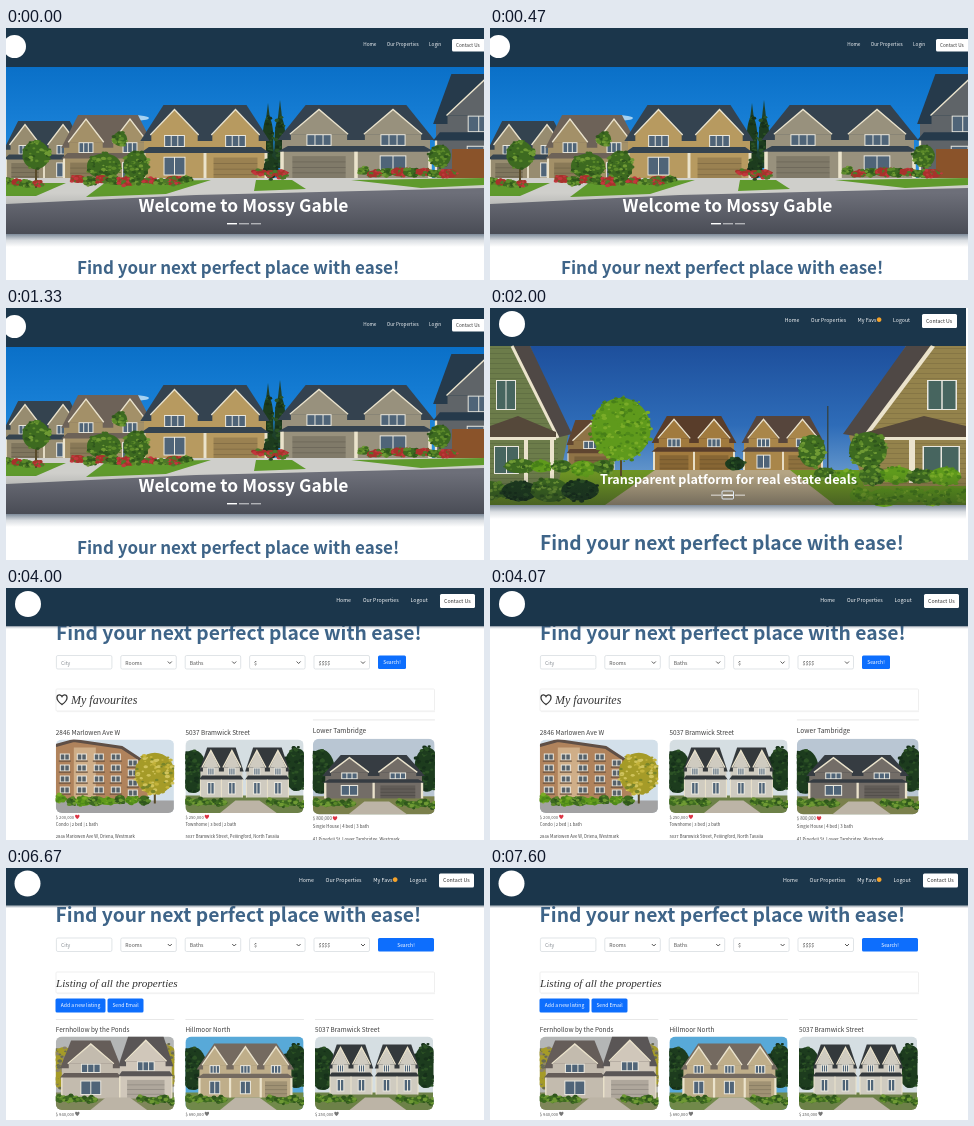
An HTML page that plays this animation: 478 px wide and 252 px high, repeating every 8000 ms.

```html
<!DOCTYPE html>
<html lang="en">
<head>
<meta charset="utf-8">
<title>Property listings</title>
<style>
html, body { margin: 0; width: 100%; height: 100%; overflow: hidden; background: #fff; }
svg { display: block; width: 478px; height: 252px; }
text { font-family: "Noto Sans CJK JP", "Noto Sans CJK SC", "Noto Sans", sans-serif; white-space: pre; }
.script { font-family: "Liberation Serif", "Noto Serif", serif; font-style: italic; }
</style>
</head>
<body>
<svg id="stage" viewBox="0 0 478 252"></svg>
<script>
const NAVY = '#1b364b', BLUE = '#0d6efd', TITLE = '#3e6488', CREAM = '#ebe3cc';
const GREEN = ['#3d6a20', '#5c8a2a', '#2f561c', '#6f9a34'];
const DARK = ['#1d3c1e', '#2c5225', '#16301a'];
const LIME = ['#5f9a1c', '#7aac28', '#477f18', '#4f8a1a'];
const GOLD = ['#a59b28', '#c5b43c', '#78852a', '#d0c35c'];
const RED = ['#a8322c', '#c2373d', '#4d7a2a'];
const slogan = 'Find your next perfect place with ease!';

// Drawing helpers, each returns SVG markup
const rect = (x, y, w, h, fill, more = '') =>
  `<rect x="${x}" y="${y}" width="${w}" height="${h}" fill="${fill}" ${more}/>`;
const poly = (points, fill) => `<polygon points="${points}" fill="${fill}"/>`;
const line = (points, color, w = 1) =>
  `<polyline points="${points}" fill="none" stroke="${color}" stroke-width="${w}"/>`;
const oval = (x, y, rx, ry, fill) => `<ellipse cx="${x}" cy="${y}" rx="${rx}" ry="${ry}" fill="${fill}"/>`;
const text = (x, y, size, str, fill = '#444', more = '') =>
  `<text x="${x}" y="${y}" font-size="${size}" fill="${fill}" ${more}>${str}</text>`;
const bold = (x, y, size, str, fill) => text(x, y, size, str, fill, 'font-weight="700"');
const script = (x, y, size, str) => text(x, y, size, str, '#333', 'class="script"');
const grad = (id, ...stops) => `<linearGradient id="${id}" x2="0" y2="1">${stops.map((s, i) =>
  `<stop offset="${i / (stops.length - 1)}" stop-color="${s}"/>`).join('')}</linearGradient>`;
const repeat = (n, draw) => Array.from({ length: n }, (_, i) => draw(i)).join('');

function random(seed) {
  return () => (seed = (seed * 16807) % 2147483647) / 2147483647;
}

// Clump of leaves filling an ellipse
function leaves(cx, cy, rx, ry, colors) {
  const rnd = random(Math.round(cx * 131 + cy * 17 + 7));
  return oval(cx, cy, rx * .9, ry * .9, colors[0]) + repeat(Math.ceil(rx * ry / 6) + 10, () => {
    const a = rnd() * 6.283, d = Math.sqrt(rnd()) * .95, r = 1 + rnd() * 1.6;
    return oval((cx + Math.cos(a) * rx * d).toFixed(1), (cy + Math.sin(a) * ry * d).toFixed(1),
      r.toFixed(1), (r * .7).toFixed(1), colors[Math.floor(rnd() * colors.length)]);
  });
}

// Row of low bushes with varied size
function hedge(x0, x1, y, r, palettes) {
  const rnd = random(x0 + 50 + y * 3);
  return repeat(Math.ceil((x1 - x0) / (r * 1.5)), i =>
    leaves(x0 + i * r * 1.5, y + rnd() * 3, r * (.7 + rnd() * .6), r * (.4 + rnd() * .3), palettes[i % palettes.length]));
}

const tree = (x, y, r, colors, base) => rect(x - 1, y, 2, base - y, '#574a2a') + leaves(x, y, r, r * 1.05, colors);

function pane(x, y, w, h, cols = 2, glass = '#4f6478') {
  const step = (w - 1) / cols;
  return rect(x, y, w, h, '#e9e7de') + repeat(cols, i => rect(x + 1 + i * step, y + 1, step - 1, h - 2, glass));
}

const garage = (x, y, w, h) => rect(x, y, w, h, '#000', 'opacity=".16"')
  + repeat(3, i => rect(x, y + h * (i + 1) / 4, w, .7, '#000', 'opacity=".2"'));

const gable = (x, peak, w, h, wall) => poly([x, peak + h, x + w / 2, peak, x + w, peak + h], wall)
  + line([x - 1, peak + h, x + w / 2, peak, x + w + 1, peak + h], CREAM, 1.4);

// Two-storey house; bays name the ground floor: g garage, w window
function house(x, base, w, h, bays, wall, roof) {
  const n = bays.length, bay = w / n, eave = base - h * .6, band = base - h * .36;
  const slope = (top, bottom, inset) =>
    poly([x - w * .03, bottom, x + w * inset, top, x + w * (1 - inset), top, x + w * 1.03, bottom], roof);
  return rect(x, eave, w, base - eave, wall) + slope(base - h, eave + h * .08, .16)
    + repeat(n, i => {
      const left = x + (i + .12) * bay, wide = bay * .76, mid = x + (i + .5) * bay;
      return gable(left, base - h * .94, wide, h * .34, wall) + rect(left, eave, wide, h * .2, wall)
        + pane(mid - bay * .17, eave, bay * .34, h * .16, 3);
    })
    + slope(band - h * .08, band, .04)
    + repeat(n, i => bays[i] === 'g' ? garage(x + (i + .14) * bay, base - h * .3, bay * .72, h * .3)
      : pane(x + (i + .32) * bay, base - h * .31, bay * .36, h * .25))
    + repeat(n + 1, i => rect(x + i * bay - w * .012, band, w * .024, h * .36, CREAM));
}

function street() {
  return rect(0, 39, 478, 167, 'url(#sky1)') + oval(126, 90, 17, 3, '#a5d2f2')
    + house(0, 153, 76, 60, 'gw', '#978c70', '#34434f') + house(58, 155, 88, 68, 'gw', '#a39068', '#6d6258')
    + house(430, 150, 96, 104, 'w', '#5f6468', '#263a4b')
    + repeat(2, i => poly([262 + i * 12, 75 - i * 3, 270 + i * 12, 140, 254 + i * 12, 140], '#1f402c')
      + leaves(262 + i * 12, 112, 6, 26, DARK))
    + house(138, 152, 122, 75, 'wg', '#b79a60', '#344350') + house(276, 150, 148, 73, 'gw', '#98917d', '#34424f')
    + rect(446, 121, 32, 29, '#8a532a')
    + rect(0, 150, 478, 30, '#cfcfcb') + poly('0,155 60,155 30,168 0,168', '#5f9a2c')
    + poly('100,154 205,152 160,166 80,169', '#5f9a2c') + poly('250,152 286,152 300,161 248,163', '#5f9a2c')
    + poly('345,152 478,150 478,157 415,160', '#5f9a2c')
    + tree(30, 127, 15, GREEN, 160) + tree(434, 128, 12, GREEN, 150) + leaves(98, 138, 19, 14, GREEN)
    + leaves(130, 138, 14, 17, GREEN) + leaves(114, 111, 8, 8, GREEN) + leaves(265, 140, 8, 12, DARK)
    + hedge(0, 40, 153, 7, [GREEN, RED]) + hedge(72, 190, 151, 8, [RED, GREEN])
    + hedge(254, 285, 144, 7, [RED]) + hedge(358, 446, 143, 8, [GREEN, RED])
    + poly('0,176 190,167 478,160 478,206 0,206', '#6d6f79') + rect(0, 165, 478, 41, 'url(#shade)');
}

// House at the left edge, cut off by the frame
function nearHouse(wall) {
  return poly('0,38 40,38 78,128 68,178 0,178', wall)
    + repeat(28, i => rect(0, 40 + i * 5, 40 + Math.min(i, 14) * 2, .7, '#000', 'opacity=".14"'))
    + poly('24,38 40,38 82,126 66,130', '#4f4845') + line('22,38 68,130', CREAM, 3)
    + pane(6, 72, 20, 30, 2, '#47655f') + poly('0,118 28,108 66,124 66,130 0,130', '#55483a')
    + rect(0, 129, 66, 3, CREAM) + pane(4, 138, 25, 28, 2, '#47655f')
    + repeat(2, i => rect(34 + i * 26, 131, 4, 44, CREAM));
}

function suburb() {
  return rect(0, 38, 476, 159, 'url(#sky2)')
    + house(78, 164, 46, 52, 'g', '#8f7346', '#5f4530') + house(164, 164, 80, 56, 'gg', '#a17a3e', '#593d2a')
    + house(254, 164, 78, 56, 'wg', '#a9864a', '#56453c') + rect(337, 98, 1.5, 62, '#34474f')
    + rect(0, 162, 476, 35, '#6d9424') + poly('165,162 300,162 345,197 115,197', '#b5a584')
    + nearHouse('#6c7c4a') + `<g transform="translate(476) scale(-1.5 1)">${nearHouse('#94834c')}</g>`
    + tree(131, 121, 33, LIME, 168) + leaves(322, 143, 15, 18, GREEN) + leaves(378, 142, 21, 20, GREEN)
    + leaves(245, 156, 11, 7, DARK) + hedge(30, 130, 158, 14, [GREEN, LIME]) + hedge(335, 478, 166, 16, [GREEN, LIME])
    + hedge(0, 110, 182, 20, [GREEN, DARK]) + hedge(370, 478, 187, 16, [LIME]) + rect(0, 165, 476, 32, 'url(#shade)');
}

// Card pictures, each 118 by 74
const yard = (sky, back, lawn, building) => rect(0, 0, 118, 74, sky) + leaves(8, 32, 15, 24, back)
  + leaves(111, 30, 14, 24, back) + rect(0, 56, 118, 18, lawn) + building
  + poly('50,61 74,61 92,74 34,74', '#bcb4a6') + hedge(4, 44, 62, 7, [GREEN]) + hedge(86, 118, 62, 7, [GREEN]);

const pictures = {
  condo: () => rect(0, 0, 118, 74, '#d3e0ea') + poly('0,6 18,1 66,8 92,25 92,62 0,62', '#b0835c')
    + line('0,6 18,1 66,8 92,25', '#5f4f46', 3) + rect(18, 8, 22, 54, '#cfae88')
    + repeat(4, r => repeat(5, c => pane(4 + c * 17, 14 + r * 11 + (c > 3 ? 6 - r : 0), 10, 7, 2, '#566169')
      + rect(3 + c * 17, 21 + r * 11 + (c > 3 ? 6 - r : 0), 12, 1.2, '#67503f')))
    + rect(0, 61, 118, 13, '#a2a2a3') + tree(99, 34, 22, GOLD, 64) + hedge(4, 96, 59, 8, [LIME, GREEN]),
  town: () => yard('#d5dee2', DARK, '#6d8148', repeat(2, i => house(15 + i * 46, 58, 42, 50, 'ww', '#cfcbc0', '#34393c'))),
  modern: () => yard('#b9c6d3', DARK, '#7b804c', house(12, 58, 94, 42, 'wg', '#736d67', '#363c42')),
  cottage: () => yard('#b4b6b6', GOLD.slice(0, 1).concat('#8d8468', '#686b52'), '#7f865a',
    house(6, 62, 58, 58, 'w', '#c3bbae', '#655d59') + house(64, 62, 52, 62, 'g', '#d0c7ba', '#5a5656')),
  villa: () => yard('#58a9d8', DARK, '#71894a', house(14, 61, 92, 54, 'wwg', '#bfae8a', '#746a60'))
};

const heart = (x, y, size, fill, more = '') =>
  `<path transform="translate(${x} ${y}) scale(${size})" d="M0 4C-7-1-4-5-2-4.5Q-.6-4.2 0-3Q.6-4.2 2-4.5C4-5 7-1 0 4Z" fill="${fill}" ${more}/>`;

// Card in one of three columns, y is the top of its picture
function card(column, y, pic, title, price, color, ...details) {
  const x = 49.8 + column * 129.6;
  return text(x, y - 5, 6.4, title, '#3c3c3c')
    + `<g transform="translate(${x} ${y})"><g clip-path="url(#card)">${pictures[pic]()}</g></g>`
    + text(x, y + 79, 4.2, price, '#555') + heart(x + 21.5, y + 77.5, .5, color)
    + details.map((d, i) => text(x, y + 86.5 + i * 12.4, 4.2, d)).join('');
}

const divider = (column, y) => rect(49.8 + column * 129.6, y, 118.5, .7, '#dedede');

const button = (x, y, w, h, label) => rect(x, y, w, h, BLUE, 'rx="1.5"')
  + text(x + w / 2, y + h / 2 + 1.8, 5, label, '#fff', 'text-anchor="middle"');

// Header bar; links run leftwards from the contact button
function header(h, logo, box, size, links) {
  const [cx, cy, r] = logo, [x, y, w, bh] = box, base = y + bh / 2 + 1.5;
  const run = links.map((l, i) => `<tspan dx="${i ? size * 2.2 : 0}">${l}</tspan>`).join('');
  return rect(0, h, 478, 3, 'url(#drop)') + rect(0, 0, 478, h, NAVY) + oval(cx, cy, r, r, '#fff')
    + text(x - size * 2.3, base - .5, size, run, '#f4f6f8', 'text-anchor="end"')
    + rect(x, y, w, bh, '#fff', 'rx="1.5"') + text(x + 4, base + .4, size, 'Contact Us', '#333');
}

const favs = 'My Favs<tspan fill="#f5a32b">●</tspan>';

function form(y, buttonWidth) {
  return ['City', 'Rooms', 'Baths', '$', '$$$$'].map((label, i) => {
    const x = 50.4 + i * 64.4;
    return rect(x, y, 55.5, 13.5, '#fff', 'stroke="#d3d8dd" stroke-width=".7" rx="1.5"')
      + text(x + 4.5, y + 9, 5.2, label, i ? '#555' : '#8a9096')
      + (i ? line([x + 47, y + 6, x + 49, y + 8, x + 51, y + 6], '#444', .9) : '');
  }).join('') + button(372, y, buttonWidth, 13.5, 'Search!');
}

const panel = (y, h) => rect(50, y, 378.5, h, '#fff', 'stroke="#ebebeb" stroke-width=".8" rx="1"')
  + rect(51, y + h, 378, 1.2, '#f2f2f2');

const dashes = (y, active) => repeat(3, i =>
  rect(221 + i * 12, y, 10, 1.4, '#fff', `opacity="${i === active ? 1 : .55}"`));

const town = ['town', '5037 Bramwick Street', '$ 250,000'];

const scenes = [
  () => header(39, [8.5, 18.5, 11.5], [446, 11, 34, 12.5], 4.7, ['Home', 'Our Properties', 'Login'])
    + rect(0, 206, 478, 13, 'url(#drop)') + street() + bold(132.5, 184, 17.4, 'Welcome to Mossy Gable', '#fff')
    + dashes(195, 0) + bold(71, 246, 17, slogan, TITLE),

  () => header(38, [22, 16, 13], [432, 6, 35, 14], 5.2, ['Home', 'Our Properties', favs, 'Logout'])
    + rect(0, 197, 476, 14, 'url(#drop)') + suburb()
    + bold(110, 175.5, 12.6, 'Transparent platform for real estate deals', '#fff')
    + dashes(186.5, 1) + rect(232, 183, 11.5, 8, 'none', 'stroke="#dfe9f5" rx="1"')
    + bold(50, 242, 19.2, slogan, TITLE) + rect(476, 0, 2, 252, '#fff'),

  () => bold(50, 52, 19.3, slogan, TITLE)
    + header(38, [22, 16, 13], [434, 6, 35, 14], 5.3, ['Home', 'Our Properties', 'Logout'])
    + form(67.5, 28) + panel(101, 22)
    + heart(56, 112, 1.15, 'none', 'stroke="#333" stroke-width="1.1"') + script(65, 115.5, 12, 'My favourites')
    + card(0, 151.5, 'condo', '2846 Marlowen Ave W', '$ 200,000', '#dc3545',
      'Condo | 2 bed | 1 bath', '2846 Marlowen Ave W, Orlena, Westmark')
    + card(1, 151.5, ...town, '#dc3545', 'Townhome | 3 bed | 2 bath', '5037 Bramwick Street, Pellingford, North Tavalia')
    + '<g transform="translate(-11.4 -5.4) scale(1.03)">' + divider(2, 133)
    + card(2, 151.5, 'modern', 'Lower Tambridge', '$ 800,000', '#dc3545',
      'Single House | 4 bed | 3 bath', '41 Pinedell St, Lower Tambridge, Westmark') + '</g>',

  () => bold(49.5, 54, 19.3, slogan, TITLE)
    + header(37.5, [21.5, 15.5, 13], [433, 5.5, 35, 14], 5.3, ['Home', 'Our Properties', favs, 'Logout'])
    + form(70, 56) + panel(104, 21) + script(50, 118.5, 11.15, 'Listing of all the properties')
    + button(49.5, 130.5, 50, 14, 'Add a new listing') + button(101.5, 130.5, 36, 14, 'Send Email')
    + repeat(3, i => divider(i, 151))
    + card(0, 168.5, 'cottage', 'Fernhollow by the Ponds', '$ 940,000', '#777')
    + card(1, 168.5, 'villa', 'Hillmoor North', '$ 690,000', '#777')
    + card(2, 168.5, ...town, '#777')
];

const defs = '<defs>' + grad('sky1', '#0a70c8', '#1e86dc', '#58b0ea') + grad('sky2', '#1d4f9c', '#2e6cb8', '#86b2d8')
  + grad('shade', 'rgba(20,24,32,0)', 'rgba(20,24,32,.4)')
  + grad('drop', 'rgba(40,62,86,.6)', 'rgba(40,62,86,.17)', 'rgba(40,62,86,0)')
  + '<clipPath id="card"><rect width="118.5" height="73.5" rx="6"/></clipPath></defs>';

const stage = document.getElementById('stage');
stage.innerHTML = defs + scenes.map(draw => `<g>${draw()}</g>`).join('');
const groups = [...stage.querySelectorAll(':scope > g')];
const LOOP = 8000, HOLD = LOOP / scenes.length;

function show(t) {
  const current = Math.floor((t % LOOP) / HOLD);
  groups.forEach((g, i) => g.setAttribute('display', i === current ? 'inline' : 'none'));
}

const start = performance.now();
function tick() {
  show(performance.now() - start);
  requestAnimationFrame(tick);
}
tick();
</script>
</body>
</html>
```
